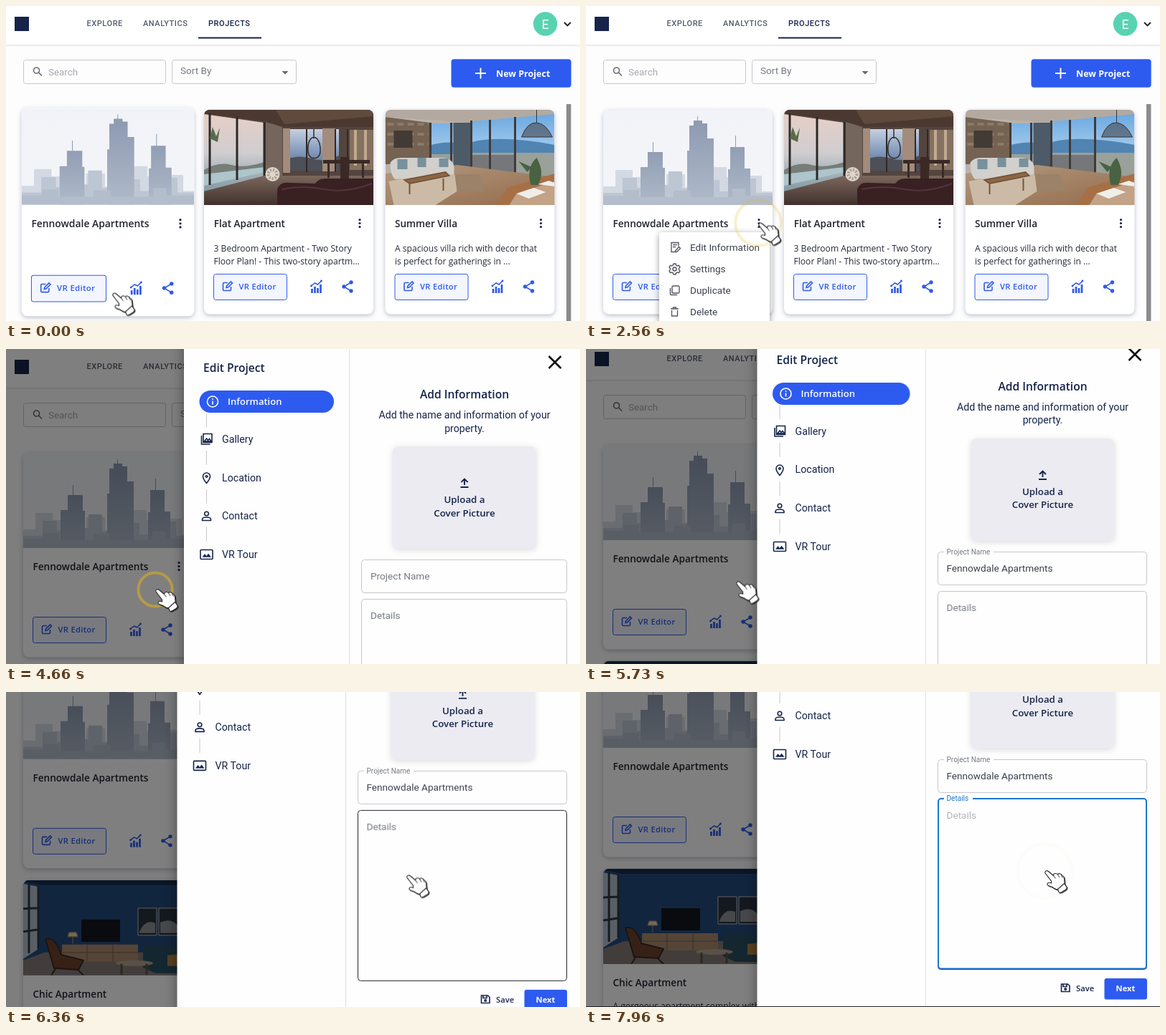
Animation, 800 px wide and 440 px high, one loop 8000 ms. Source, as an HTML page:

```html
<!DOCTYPE html>
<html lang="en">
<head>
<meta charset="utf-8">
<title>Edit project</title>
<style>
html, body { margin: 0; width: 100%; height: 100%; overflow: hidden; background: #fdfdfe; }
svg { display: block; }
.stage { width: 800px; height: 440px; }
text { font: 400 13.6px Roboto, sans-serif; fill: #3c4150; white-space: pre; }
.os { font-family: "Open Sans", sans-serif; font-weight: 600; fill: #16244b; }
.title { font-size: 13.6px; fill: #20242f; }
.desc { font: 400 12.1px "Open Sans", sans-serif; fill: #24293a; }
.nav { font-size: 11px; font-weight: 500; letter-spacing: .55px; fill: #555c6b; }
.grey { fill: #767b84; }
.step { font-size: 14.2px; fill: #16244b; }
.mid { text-anchor: middle; }
.white { fill: #fff; }
.line { fill: none; stroke: currentColor; stroke-width: 1.6; }
.box { fill: none; stroke: #c6c7cb; }
.panel { fill: #fff; filter: drop-shadow(0 2px 3px #2233554d); }

/* One loop is 8 s, so 1% is 80 ms. */
.cam, .hand, .hovered, .menu, .row, .ripple, .drawer, .shade, .late, .early, .nudge,
.hoverbox, .focus, .label, .hint { animation: 8s linear infinite; }

.cam { animation-name: cam; }
@keyframes cam {
  0%, 70% { transform: none; animation-timing-function: cubic-bezier(.333,0,.667,1); }
  81.5%, 100% { transform: translateY(-200px); }
}
.hand { animation-name: hand; }
@keyframes hand {
  0%, 12.6% { transform: translate(148px,400.5px); animation-timing-function: cubic-bezier(.333,0,.667,1); }
  22.5%, 40% { transform: translate(240px,302.5px); animation-timing-function: cubic-bezier(.333,0,.667,1); }
  46.6%, 71.25% { transform: translate(208px,335px); animation-timing-function: cubic-bezier(.4,0,.7,.69); }
  79.5% { transform: translate(557.5px,439.5px); animation-timing-function: cubic-bezier(.3,.525,.65,1); }
  82.75%, 100% { transform: translate(639px,449px); }
}
.ring { fill: none; stroke: #ebb414; stroke-width: 4; opacity: 0; animation: grow 8s infinite, fade 8s infinite; animation-delay: var(--at); }
@keyframes grow {
  0% { r: 0; animation-timing-function: cubic-bezier(.333,.433,.667,.767); }
  12.5%, 100% { r: 39px; }
}
@keyframes fade {
  0% { opacity: 1; animation-timing-function: cubic-bezier(.35,.05,.65,.8); }
  12.5%, 100% { opacity: 0; }
}
.hovered { transform-origin: 142px 288px; animation-name: hovered; }
@keyframes hovered {
  0%, 25.5% { transform: scale(1.02); animation-timing-function: ease; }
  29%, 100% { transform: none; }
}
.menu { transform-origin: 240px 316px; animation-name: menu; }
@keyframes menu {
  0%, 25.5% { opacity: 0; transform: scale(.75,.56); animation-timing-function: ease-out; }
  28.3%, 55.4% { opacity: 1; transform: none; }
  57%, 100% { opacity: 0; transform: none; }
}
.row { animation-name: row; }
@keyframes row { 0%, 43.5% { opacity: 0; } 44.5%, 100% { opacity: .11; } }
.ripple { animation-name: ripple; }
@keyframes ripple { 0%, 53% { r: 0; } 54.5% { r: 65px; } 57%, 100% { r: 150px; } }
.drawer { animation-name: drawer; }
@keyframes drawer {
  0%, 55.3% { transform: translateX(600px); animation-timing-function: cubic-bezier(0,0,.2,1); }
  58%, 100% { transform: none; }
}
.shade { animation-name: shade; }
@keyframes shade { 0%, 55.3% { opacity: 0; } 58%, 100% { opacity: .5; } }
.late { animation-name: late; }
@keyframes late { 0%, 69.99% { opacity: 0; } 70%, 100% { opacity: 1; } }
.early { animation-name: early; }
@keyframes early { 0%, 69.99% { opacity: 1; } 70%, 100% { opacity: 0; } }
.nudge { animation-name: nudge; }
@keyframes nudge { 0%, 69.99% { transform: none; } 70%, 100% { transform: translateX(var(--dx)); } }
.hoverbox { animation-name: hoverbox; }
@keyframes hoverbox { 0%, 78.1% { stroke: #c6c7cb; } 78.2%, 100% { stroke: #23252b; } }
.focus { animation-name: focus; }
@keyframes focus { 0%, 90.6% { opacity: 0; } 90.7%, 100% { opacity: 1; } }
.label { animation-name: label; }
@keyframes label {
  0%, 90.6% { transform: translate(502.5px,377px); fill: #767b84; animation-timing-function: ease-out; }
  93.1%, 100% { transform: translate(502.5px,352px) scale(.74); fill: #1976d2; }
}
.hint { animation-name: hint; }
@keyframes hint { 0%, 91.5% { opacity: 0; } 93.5%, 100% { opacity: 1; } }
</style>
</head>
<body>
<svg class="stage" viewBox="0 0 800 440">
<defs>
  <clipPath id="photo"><path d="M0 133V8a8 8 0 0 1 8-8h220a8 8 0 0 1 8 8v125z"/></clipPath>
  <clipPath id="firstRow"><rect x="102" y="322" width="154" height="31"/></clipPath>
  <linearGradient id="haze" x2="0" y2="1"><stop stop-color="#f1f3f8"/><stop offset="1" stop-color="#f4f5f8"/></linearGradient>
  <linearGradient id="tower" x2="0" y2="1"><stop stop-color="#8b98b0"/><stop offset="1" stop-color="#b0bac9"/></linearGradient>
  <linearGradient id="dusk" x2="0" y2="1"><stop stop-color="#e6cfc6"/><stop offset=".5" stop-color="#d0cdd0"/><stop offset="1" stop-color="#8299a3"/></linearGradient>
  <linearGradient id="sea" x2="0" y2="1"><stop stop-color="#c5d0e0"/><stop offset=".55" stop-color="#8199bd"/><stop offset="1" stop-color="#58697a"/></linearGradient>
  <linearGradient id="floor" x2="0" y2="1"><stop stop-color="#7c675b"/><stop offset="1" stop-color="#40312e"/></linearGradient>
  <linearGradient id="sky" x2="0" y2="1"><stop stop-color="#6ba9e2"/><stop offset="1" stop-color="#cde2f3"/></linearGradient>
  <linearGradient id="wood" x2="1" y2="1"><stop stop-color="#b39a80"/><stop offset="1" stop-color="#946a4b"/></linearGradient>

  <rect id="card" class="panel" width="236" height="285.5" rx="8"/>
  <g id="tools">
    <g fill="#16244b"><circle cx="217" cy="153.5" r="1.6"/><circle cx="217" cy="158.5" r="1.6"/><circle cx="217" cy="163.5" r="1.6"/></g>
    <g color="#2f5bea">
      <rect x="13.5" y="229.5" width="102" height="36" rx="3" fill="#f3f6ff" stroke="currentColor"/>
      <path class="line" d="M33 241.5h-5a1.5 1.5 0 0 0-1.5 1.5v8a1.5 1.5 0 0 0 1.5 1.5h8a1.5 1.5 0 0 0 1.5-1.5v-4M31 248.5l.5-2.5 6-6 2 2-6 6z"/>
      <text class="os" x="48.5" y="251" style="font-size:11.2px;letter-spacing:.3px;fill:#2f5bea">VR Editor</text>
      <g transform="translate(156.5 247)">
        <path d="M-6 9V3M-2 9V0M2 9V2M6 9V-3" stroke="currentColor" stroke-width="2.7"/>
        <path class="line" d="M-7-1-2-5 2-3 7-8"/>
        <circle cx="-7" cy="-1" r="1.4" fill="currentColor"/><circle cx="7" cy="-8" r="1.4" fill="currentColor"/>
      </g>
      <g transform="translate(200 247)" fill="currentColor">
        <path class="line" d="M5-6-5 0 5 6"/>
        <circle cx="5" cy="-6" r="2.7"/><circle cx="-5" r="2.7"/><circle cx="5" cy="6" r="2.7"/>
      </g>
    </g>
  </g>
</defs>

<g class="cam">
  <rect width="800" height="640" fill="#fdfdfe"/>
  <rect width="800" height="54" fill="#fff" style="filter:drop-shadow(0 1px 1.5px #0002)"/>
  <rect x="12" y="15" width="20" height="20" fill="#16244b"/>
  <text class="nav" x="112.5" y="28">EXPLORE</text>
  <text class="nav" x="191" y="28">ANALYTICS</text>
  <text class="nav" x="282" y="28" style="fill:#16244b">PROJECTS</text>
  <rect x="268" y="43.5" width="88" height="2" fill="#16244b"/>
  <circle cx="751.6" cy="25" r="16.7" fill="#58d3b1"/>
  <text class="mid white" x="751.6" y="31.5" style="font-size:18px">E</text>
  <path class="line" d="M778 23l4.500 4.500 4.500-4.500" style="stroke-width:1.9" color="#222"/>

  <g class="box"><rect x="24.5" y="75.5" width="198" height="33" rx="3"/><rect x="231.5" y="75.5" width="173" height="33" rx="3"/></g>
  <g class="line" color="#666b75"><circle cx="42.5" cy="90" r="4"/><path d="M45.5 93l4.500 4.500"/></g>
  <text x="59" y="97" style="fill:#a5a9b0;font-size:13.4px">Search</text>
  <text x="243" y="95" class="grey">Sort By</text>
  <path d="M384.5 91h9l-4.500 4.500z" fill="#666"/>
  <rect x="620.5" y="74.3" width="167.2" height="39.400" rx="4" fill="#2d5bf0"/>
  <path class="line" d="M654 94h15M661.5 86.5v15" color="#fff" style="stroke-width:1.9"/>
  <text class="os" x="683" y="99" style="font-size:12.5px;font-weight:700;fill:#fff">New Project</text>
  <rect x="781" y="137" width="6.500" height="503" fill="#8b8b8d"/>

  <g class="hovered"><g transform="translate(24 145)">
    <use href="#card"/>
    <g clip-path="url(#photo)">
      <rect width="236" height="133" fill="url(#haze)"/>
      <path fill="#d3d9e2" d="M0 133v-26h17V84h24v10h12v16h35V90h26v18h36V80h22v14h24v-2h25v22h15v19z"/>
      <path fill="#bdc6d3" d="M0 133v-17h27V95h20v14h38v-4h6V86h19v24h34V98h18v16h24V96h27v20h23v17z"/>
      <g fill="url(#tower)">
        <path d="M117 133V57h3V22h6v-7h5V9h1v6h6v4h7v21h9v93z"/>
        <path d="M52 133V80h10V59h7V45h1v14h13v22h3v52z"/>
        <path d="M174 133V83h3V52h7V36h1v16h12v30h8v51z"/>
      </g>
      <path d="M0 133v-13h28v-8h22v10h48v-9h24v9h58v-12h18v10h38v13z" fill="#b3bdcb"/>
    </g>
    <text class="os title" x="13.5" y="164">Fennowdale Apartments</text>
    <use href="#tools"/>
  </g></g>

  <g transform="translate(276 145)">
    <use href="#card"/>
    <g clip-path="url(#photo)">
      <rect width="236" height="133" fill="#54443e"/>
      <path d="M0 0h236v24H112L84 16 0 5z" fill="#4b3931"/>
      <path d="M100 0h136v9L112 20z" fill="#604a3e"/>
      <path d="M0 6l84 12v75L0 114z" fill="url(#dusk)"/>
      <path d="M0 84q20-12 38-7t46-4v8L0 92z" fill="#777d78"/>
      <path d="M0 90l84-10v7L0 106z" fill="#adc5cb"/>
      <path d="M8 5v100M46 10v88M84 17v78" stroke="#2d2927" stroke-width="3"/>
      <path d="M86 17l23 7v69H86z" fill="#75665d"/>
      <rect x="112" y="27" width="76" height="58" fill="url(#sea)"/>
      <path d="M112 70q20-8 38-2t38-4v21h-76z" fill="#4d5058"/>
      <path d="M110 26h10v62h-10zM165 26h18v60h-18z" fill="#a38c7c"/>
      <path d="M143 27v60M183 27v60M200 27v62" stroke="#302927" stroke-width="2"/>
      <path d="M203 28h33v56h-33z" fill="#85715f"/>
      <path d="M211 28v50m14-50v50" stroke="#c0a98f" stroke-width="4"/>
      <path d="M0 114l84-22h152v41H0z" fill="url(#floor)"/>
      <path d="M166 70h65v5h-65zM172 75h3v20h-3zM220 75h3v20h-3zM190 66h12v30h-12z" fill="#3a2925"/>
      <path d="M153 27v13m-8 18c-2-26 18-26 17 0 0 13-17 13-17 0z" fill="none" stroke="#342c2a" stroke-width="1.5"/>
      <path d="M102 133v-22q4-11 17-9l36 1q5-8 16-7h65v37z" fill="#392023"/>
      <path d="M108 111q30-6 60 0t66-8" fill="none" stroke="#54343a" stroke-width="2"/>
      <circle cx="95.5" cy="90" r="10" fill="#ded5ca"/><circle cx="95.5" cy="90" r="6" fill="none" stroke="#a99b8f" stroke-width="4" stroke-dasharray="2 2"/>
      <path d="M8 40l4-16 5 13 5-12-3 20z" fill="#586b4c"/>
    </g>
    <text class="os title" x="13.8" y="164">Flat Apartment</text>
    <text class="desc" x="13.500" y="198">3 Bedroom Apartment - Two Story</text>
    <text class="desc" x="13.500" y="216">Floor Plan! - This two-story apartm...</text>
    <use href="#tools"/>
  </g>

  <g transform="translate(528.5 145)">
    <use href="#card"/>
    <g clip-path="url(#photo)">
      <rect width="236" height="133" fill="#b9b2ac"/>
      <path d="M0 0h236v11l-116 7L0 10z" fill="#b4a9a0"/>
      <path d="M0 10l62 8v58H0z" fill="#746252"/>
      <path d="M3 20h57M3 34h57M3 48h57" stroke="#8c7967" stroke-width="4" stroke-dasharray="9 5"/>
      <path d="M12 29h26v24H12z" fill="#423a35"/>
      <path d="M64 19h55v60H64zM121 16l115-10v85H121z" fill="url(#sky)"/>
      <path d="M64 49q25-7 55 0v13H64zM121 45q40-10 115 4v12H121z" fill="#5184b2"/>
      <path d="M64 62h55v20H64zM121 60h115v34H121z" fill="#9aa09a"/>
      <path d="M121 63h60v28h-60z" fill="#75777a"/>
      <path d="M95 18h24v64H95z" fill="#4d5a68"/>
      <path d="M63 18v66M92 18v62M120 15v70M146 14v76M181 10v82" stroke="#413b38" stroke-width="3"/>
      <path d="M0 89l100-12 136 17v39H0z" fill="url(#wood)"/>
      <path d="M5 100l70-15 50 13-55 35H12z" fill="#cbbba6"/>
      <path d="M7 74q5-8 17-7h57q14 2 15 13v10l-82 7q-7-5-7-23z" fill="#d2d0cc"/>
      <path d="M17 69h14v14H17zM45 67h12v13H45zM75 68h13v12H75z" fill="#77919d"/>
      <path d="M27 98l57-11 5 5-55 11zM34 102v16m47-22v17" fill="#8c6746" stroke="#76553b" stroke-width="2"/>
      <path d="M97 90h35l8 24h-40z" fill="#9b8269"/>
      <path d="M155 133l15-24 66-20v44z" fill="#a76f45"/>
      <path d="M173 133l10-16 24-8 29-9v33z" fill="#c3a286"/>
      <path d="M183 117l24-8 17 6-24 9zM213 104l15-5 8 3v5z" fill="#f0eee9"/>
      <path d="M211 0v18m-21 20q8-21 21-20t22 20z" fill="#3e3b3c88" stroke="#373436"/>
      <path d="M203 105q-7-24 8-38 12 20 2 38zM198 87l-12-15 18 8z" fill="#496242"/>
    </g>
    <text class="os title" x="13.5" y="164">Summer Villa</text>
    <text class="desc" x="13.5" y="198">A spacious villa rich with decor that</text>
    <text class="desc" x="13.5" y="216">is perfect for gatherings in ...</text>
    <use href="#tools"/>
  </g>

  <g transform="translate(24 447)">
    <use href="#card"/>
    <g clip-path="url(#photo)">
      <rect width="236" height="133" fill="#244b7c"/>
      <path d="M0 0h236v7H26L0 2z" fill="#152c4d"/>
      <path d="M0 5l20 4v88L0 110z" fill="#b3bfcb"/>
      <path d="M8 5v97M0 40l20-1M0 72l20-3M21 8v88" stroke="#2c3543" stroke-width="3"/>
      <path d="M0 112l30-11h206v32H0z" fill="#867b76"/>
      <rect x="81" y="55" width="54" height="31" fill="#14171d"/>
      <path d="M54 90h106v24H54z" fill="#ab8b6f"/><path d="M54 101h106M89 90v24M125 90v24" stroke="#735c4a"/>
      <path d="M69 89V78m-5-5h10l2 6H62z" fill="#e7d3a7" stroke="#a78d62"/>
      <path d="M160 39h26v38h-26zM189 39h28v38h-28z" fill="#28323f" stroke="#c4c2bd"/>
      <path d="M162 72q8-18 22-12v14h-22zM191 74V59q15-7 24 4v11z" fill="#8f9196"/>
      <path d="M31 82q14-3 22 22l31 8-7 13-34-2zM46 122l-7 11M75 124l9 9" fill="#6f432e" stroke="#382923" stroke-width="2"/>
      <path d="M167 91h44l25 5v34h-52l-17-8z" fill="#284e60"/><path d="M201 105l19-2v17h-19z" fill="#b18443"/>
      <ellipse cx="155" cy="116" rx="26" ry="4" fill="#b1a38f"/><path d="M137 117v15m35-15v15" stroke="#5d5146" stroke-width="3"/>
    </g>
    <text class="os title" x="13.5" y="164">Chic Apartment</text>
    <text class="desc" x="13.5" y="196">A gorgeous apartment complex with</text>
  </g>

  <g class="menu">
    <rect x="102" y="316" width="154" height="132" rx="4" fill="#fff" style="filter:drop-shadow(0 2px 4px #0006)"/>
    <g clip-path="url(#firstRow)">
      <rect class="row" x="102" y="322" width="154" height="31"/>
      <circle class="ripple" cx="208" cy="336" fill="#000" opacity=".14"/>
    </g>
    <g class="line" color="#55585f" style="stroke-width:1.4">
      <path d="M126 343.5h-7v-13h10v5M121 333.5h6M121 336.5h4M124.5 342l5-5.500 2 2-5 5h-2z"/>
      <circle cx="123.5" cy="367.5" r="2.5"/>
      <path d="M122 360h3l.5 2 2 1 2-.7 1.500 2.700-1.500 1.500v2l1.500 1.500-1.500 2.700-2-.7-2 1-.5 2h-3l-.5-2-2-1-2 .7-1.500-2.700 1.500-1.500v-2l-1.500-1.500 1.500-2.700 2 .7 2-1z"/>
      <rect x="120" y="391" width="10" height="10" rx="1.5"/><path d="M117.5 394v8.500a1 1 0 0 0 1 1h8.500"/>
      <path d="M118 423h11M121.5 422.5v-1.500h4v1.500M119.5 425v8h8v-8"/>
    </g>
    <text x="145" y="342">Edit Information</text>
    <text x="145" y="372">Settings</text>
    <text x="145" y="402">Duplicate</text>
    <text x="145" y="432">Delete</text>
  </g>

  <rect class="shade" width="800" height="640"/>

  <g class="drawer">
    <rect class="nudge" style="--dx:-9.5px;filter:drop-shadow(0 0 9px #0006)" x="248" y="-20" width="600" height="680" fill="#fefefe"/>
    <path class="nudge" style="--dx:-5.5px" d="M478.5 0v640" stroke="#dedfe2"/>
    <path class="line" d="M756.5 10l17 17m0-17l-17 17" style="stroke-width:2.5" color="#111"/>

    <g class="nudge" style="--dx:-9.5px">
      <text class="os" x="275" y="32" style="font-size:15.6px">Edit Project</text>
      <rect x="269.5" y="58" width="187.5" height="31" rx="15.5" fill="#2d5bf0"/>
      <rect class="late" x="420" y="58" width="41" height="31" rx="15.5" fill="#2d5bf0"/>
      <g class="line" color="#fff"><circle cx="288" cy="73.5" r="7.5"/><path d="M288 72.5v5M288 69v1.800"/></g>
      <text class="os" x="309" y="78" style="font-size:13px;fill:#fff">Information</text>
      <path d="M279.5 90v19M279.5 142v20M279.5 196v20M279.5 249v20" stroke="#c9c6c8"/>
      <g class="line" color="#16244b">
        <path d="M275 118.5h12v12h-12zM272.5 121v12h12M276.5 129l3-4 2 2.500 2-2 2.500 3.500z"/>
        <path d="M279.5 187.5q-5-6-5-9.500a5 5 0 0 1 10 0q0 3.500-5 9.500z"/><circle cx="279.5" cy="178" r="1.3"/>
        <circle cx="279.5" cy="230" r="2.8"/><path d="M273.5 239.5v-1.500q0-3 6-3t6 3v1.500z"/>
        <rect x="271" y="280.5" width="17" height="13" rx="1"/><path d="M274 290.5l3-4 2.500 3 2.500-3.500 3.500 4.500z" fill="currentColor" style="stroke-width:.5"/>
      </g>
      <text class="step" x="301" y="131">Gallery</text>
      <text class="step" x="301" y="184.5">Location</text>
      <text class="step" x="301" y="238">Contact</text>
      <text class="step" x="301" y="292">VR Tour</text>
    </g>

    <g class="nudge mid" style="--dx:-2.5px">
      <text class="os" x="639" y="69" style="font-size:15.6px">Add Information</text>
      <text class="step" x="639" y="97">Add the name and information of your</text>
      <text class="step" x="639" y="115.5">property.</text>
      <rect x="539" y="136" width="200" height="143" rx="8" fill="#ebebf1" style="filter:drop-shadow(0 2px 4px #0002)"/>
      <path class="line" d="M633.5 193h11M639 190v-8M634.5 186l4.500-4.500 4.500 4.500" style="stroke-width:1.9" color="#16244b"/>
      <text class="os" x="639" y="215" style="font-size:13.3px">Upload a</text>
      <text class="os" x="639" y="233.5" style="font-size:13.3px">Cover Picture</text>
    </g>

    <g class="early">
      <g class="box"><rect x="495.5" y="294.5" width="286" height="46" rx="4"/><rect x="495.5" y="349.5" width="286" height="238" rx="4"/></g>
      <text class="grey" x="508" y="322">Project Name</text>
      <text class="grey" x="508" y="377">Details</text>
    </g>
    <g class="late">
      <rect class="box" x="490.5" y="294.5" width="291" height="46" rx="4"/>
      <path d="M499 294.5h69" stroke="#fefefe" stroke-width="3"/>
      <text class="grey" x="502.5" y="298" style="font-size:10.05px">Project Name</text>
      <text x="502.5" y="322">Fennowdale Apartments</text>
      <rect class="box hoverbox" x="490.5" y="349.5" width="291" height="238" rx="4"/>
      <g class="focus">
        <rect x="491" y="349" width="290" height="237.5" rx="4" fill="#fefefe" stroke="#1f75d0" stroke-width="2"/>
        <path d="M499 349h40" stroke="#fefefe" stroke-width="4"/>
      </g>
      <text class="hint" x="502.5" y="377" style="fill:#b2b5ba">Details</text>
      <text class="label">Details</text>
      <g class="line" color="#16244b"><path d="M662.5 608h9l2.500 2.500v8h-11.500zM665 608.5v3h5v-3"/><circle cx="668.2" cy="615" r="1.2"/></g>
      <text class="os" x="683" y="617.5" style="font-size:11.2px">Save</text>
      <rect x="722.5" y="600" width="59.5" height="29.5" rx="3" fill="#2d5bf0"/>
      <text class="os mid" x="752" y="618" style="font-size:11.2px;font-weight:700;fill:#fff">Next</text>
    </g>
  </g>
  <rect y="639" width="800" height="1" fill="#222"/>

  <circle class="ring" cx="240" cy="303" style="--at:1.8s"/>
  <circle class="ring" cx="208" cy="336" style="--at:4.13s"/>
  <circle class="ring" cx="639.5" cy="450" style="--at:7s"/>
  <g class="hand">
    <g fill="#fff" stroke="#303034" stroke-width="1.2" stroke-linejoin="round" style="filter:drop-shadow(1.2px 1.5px .7px #000a)">
      <path d="M1 4C0 1 3-.5 6 2l6.500 5.500q0-3 3-3 2.500 0 3 1.500 1-2 3.500-1 2 .5 2 2.500 3 0 3.500 4l.8 8L20 27q-5 0-9-3.500l-5.500-2Q3 20 4.500 18q2-1.500 5 0L9.500 15z"/>
      <path d="M18.5 26.500l9-8 3.500 5q.5 2-2 4l-5 3q-3 1.500-4 0z"/>
      <path d="M12.5 7.500l3 4M18.500 6l2.500 4M24 7.500l1.500 3" fill="none" stroke="#666"/>
    </g>
  </g>
</g>
</svg>
</body>
</html>
```
